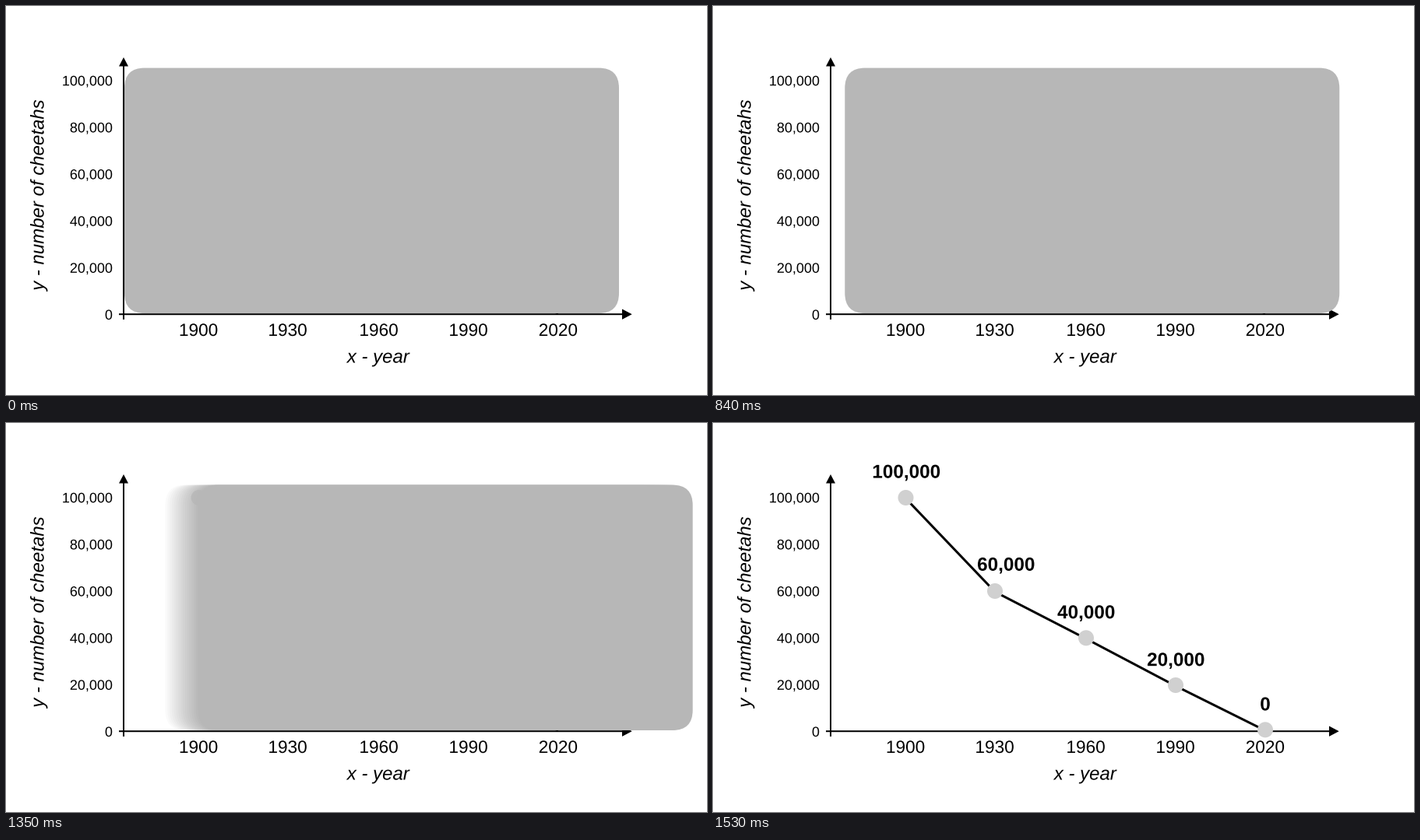
A matplotlib script for the animation above (5400 ms loop, 900x500 px).

```python
import numpy as np
import matplotlib.pyplot as plt
from matplotlib.animation import FuncAnimation
from matplotlib.patches import Circle, FancyBboxPatch, PathPatch, Polygon
from matplotlib.textpath import TextPath
from matplotlib.transforms import Affine2D

WIDTH, HEIGHT, DPI = 900, 500, 100
FRAMES, INTERVAL = 180, 30
DRIFT_START, SLIDE_START, COVER_GONE = 10, 42.6, 51
POP_START, POP_PEAK, LAST_DOT_SHOWN = 45, 49, 49
COPIES = 16
AXIS_Y = 396.2

fig = plt.figure(figsize=(WIDTH / DPI, HEIGHT / DPI), dpi=DPI, facecolor="white")
ax = fig.add_axes([0, 0, 1, 1])
ax.set_xlim(0, WIDTH)
ax.set_ylim(HEIGHT, 0)
ax.axis("off")


def place(x, y, scale=1, angle=0):
    """Put upright glyph outlines on the stage, whose y axis points down."""
    return (Affine2D().scale(scale, -scale).rotate_deg(angle)
            .translate(x, y) + ax.transData)


def write(x, y, text, px, align=0.5, angle=0, z=1, **style):
    font = {"family": "Liberation Sans", **style}
    outline = TextPath((0, 0), text, size=px, prop=font)
    box = outline.get_extents()
    outline = Affine2D().translate(-box.x0 - align * box.width, 0).transform_path(outline)
    patch = PathPatch(outline, fc="black", lw=0, zorder=z)
    ax.add_patch(patch)
    patch.set_transform(place(x, y, angle=angle))
    return patch


def stroke(xs, ys, px, z):
    ax.plot(xs, ys, color="black", lw=px * 72 / DPI, solid_capstyle="butt",
            solid_joinstyle="round", snap=False, zorder=z)


def arrow_head(corners):
    ax.add_patch(Polygon(corners, closed=True, fc="black", lw=0, zorder=1))


# Axes with their captions
stroke([151, 151], [76, 403], 2, 1)
stroke([145, 793], [AXIS_Y, AXIS_Y], 2, 1)
arrow_head([(151, 66), (145, 77.5), (157, 77.5)])
arrow_head([(803.7, AXIS_Y), (791, AXIS_Y - 6.7), (791, AXIS_Y + 6.7)])

for i in range(6):
    write(136.2, 403 - 60.15 * i, f"{20000 * i:,}", 18, align=1)

xs = np.array([247.5, 362, 479, 594, 709])
ys = np.array([96, 216, 276.3, 337, 394.3])
for x, year in zip(xs, range(1900, 2021, 30)):
    write(x, 424, str(year), 22.6)

write(477.7, 458.5, "x - year", 24, style="italic")
write(48.4, 244, "y - number of cheetahs", 24, angle=-90, style="italic")

# Data series
stroke(xs, ys + 1, 3, 2)
dots = [ax.add_patch(Circle(p, 10, fc="#d0d0d0", lw=0, zorder=3))
        for p in zip(xs, ys)]
values = [100000, 60000, 40000, 20000, 0]
label_spots = [(248.5, 70.6), (376.2, 189.8), (478.9, 251.2), (594.2, 312.2), (709, 369.4)]
labels = [write(x, y, f"{v:,}", 24.3, z=4, weight="bold")
          for (x, y), v in zip(label_spots, values)]

# Nested copies whose alphas add up to an even motion blur
cover = [ax.add_patch(FancyBboxPatch((152, 79.6), 635, 315.4, fc="#b7b7b7", lw=0,
                                     boxstyle="round,pad=0,rounding_size=26",
                                     alpha=1 / (COPIES - i), zorder=5 + i))
         for i in range(COPIES)]


def cover_left(n):
    drift = 0.96 * np.clip(n - DRIFT_START, 0, 32)
    return 152 + drift + 11.1 * max(0, n - SLIDE_START) ** 2


def label_scale(n):
    if n <= POP_PEAK:
        return 0.315 * max(0, n - POP_START)
    return max(1, 1.26 - 0.13 * (n - POP_PEAK))


def update(n):
    sliding = n > SLIDE_START
    lefts = np.linspace(cover_left(n - 1), cover_left(n), COPIES)
    for i, (box, left) in enumerate(zip(cover, lefts)):
        box.set_x(left)
        box.set_visible(n < COVER_GONE and (sliding or i == COPIES - 1))
    scale = label_scale(n)
    for label, (x, y) in zip(labels, label_spots):
        label.set_visible(scale > 0)
        label.set_transform(place(x, y, max(scale, 0.1)))
    dots[-1].set_visible(n >= LAST_DOT_SHOWN)
    return cover + labels + dots


anim = FuncAnimation(fig, update, frames=FRAMES, interval=INTERVAL,
                     repeat=True, repeat_delay=0, blit=False)
plt.show()
```
